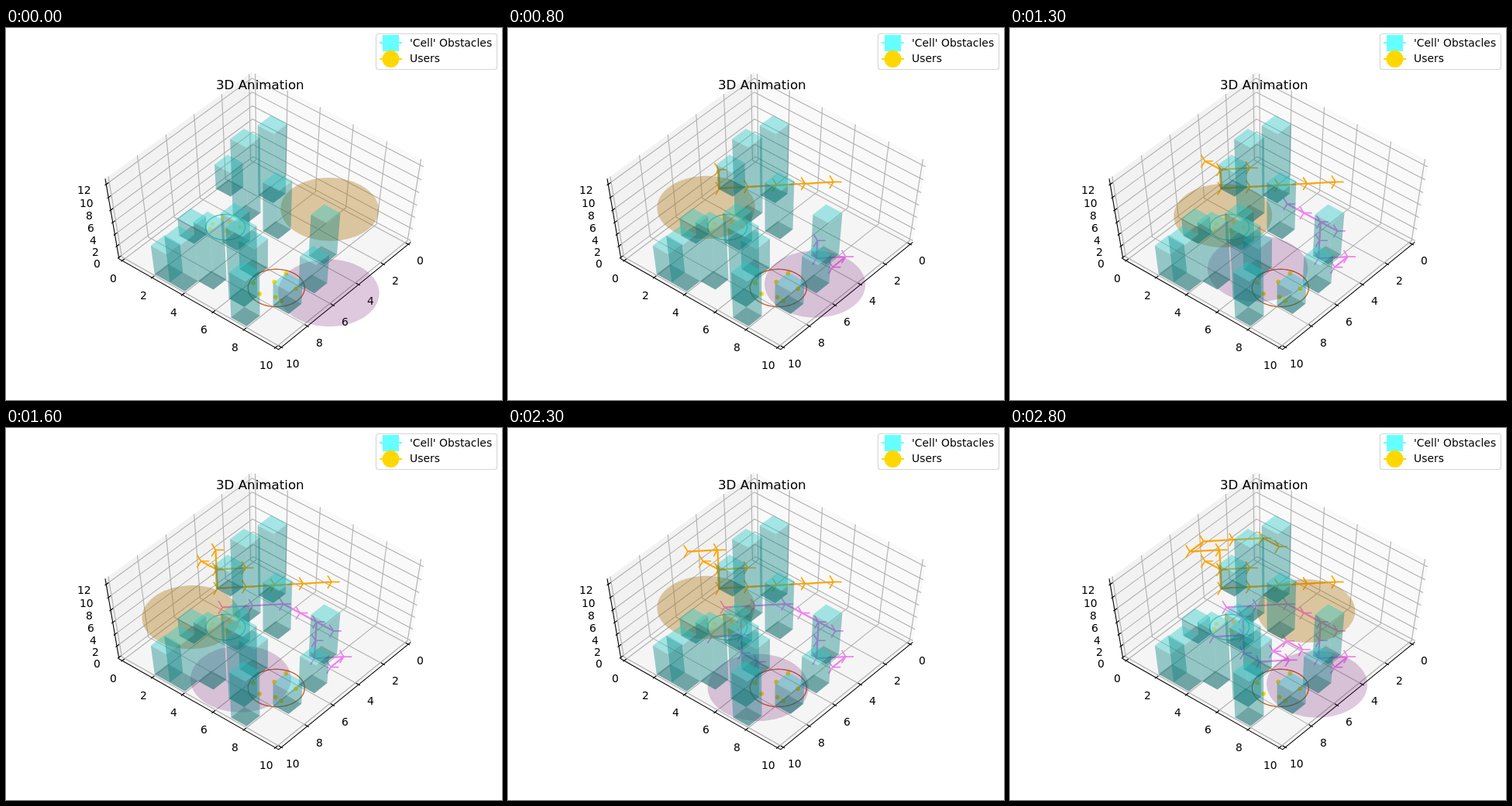
Animation of 640x480 px, one loop 2900 ms. Source, as an HTML page with a canvas:

```html
<!DOCTYPE html>
<html lang="en">
<head>
<meta charset="utf-8">
<title>3D Animation</title>
<style>
  html, body { margin: 0; width: 100%; height: 100%; overflow: hidden; background: #fff; }
  canvas { display: block; width: 640px; height: 480px; }
</style>
</head>
<body>
<canvas id="stage" width="640" height="480"></canvas>
<script>
const ctx = document.getElementById('stage').getContext('2d');
const STEP = 100, COUNT = 29, TOP = 12.6;
const LO = -1 / 4.8, HI = 10 + 1 / 4.8, ZLO = -TOP / 48, ZHI = TOP * 49 / 48;
const GRID = '#b0b0b0';

// Perspective camera: elevation 60, azimuth 40, distance 10.
const az = 40 * Math.PI / 180, el = 60 * Math.PI / 180;
const ca = Math.cos(az), sa = Math.sin(az), ce = Math.cos(el), se = Math.sin(el);
function project(x, y, z) {
  const a = x / 10 - .5, b = y / 10 - .5, c = z / TOP - .5;
  const depth = 10 - (a * ca * ce + b * sa * ce + c * se);
  const right = b * ca - a * sa;
  const up = c * ce - (a * ca + b * sa) * se;
  return [334.7 + 2681.1 * right / depth, 237.4 - 1997.8 * up / depth];
}

function trace(points) {
  ctx.beginPath();
  points.forEach(p => ctx.lineTo(...project(...p)));
}
function fill(points, color) {
  trace(points);
  ctx.fillStyle = color;
  ctx.fill();
}
function line(points, color, width = 1.1) {
  trace(points);
  ctx.strokeStyle = color;
  ctx.lineWidth = width;
  ctx.stroke();
}
function text(str, x, y, size = 13.89, centred = true) {
  ctx.font = size + 'px "DejaVu Sans", sans-serif';
  ctx.fillStyle = '#000';
  const left = centred ? x - ctx.measureText(str).width / 2 : x;
  ctx.fillText(str, Math.round(left), Math.round(y));
}
function disc(x, y, r, color) {
  ctx.beginPath();
  ctx.arc(x, y, r, 0, 2 * Math.PI);
  ctx.fillStyle = color;
  ctx.fill();
}
const polar = (x, y, r, t) => [x + r * Math.cos(t), y + r * Math.sin(t), 0];
const circle = (x, y, r) => Array.from({ length: 73 }, (_, i) => polar(x, y, r, i * Math.PI / 36));

// Towers: cell and height, painted back to front.
const towers = [
  [1, 2, 11], [3, 2, 12], [2, 0, 4], [3, 4, 8], [3, 7, 7],
  [5, 8, 5], [7, 8, 4], [9, 7, 8], [6, 5, 5], [6, 1, 3],
  [9, 2, 5], [9, 3, 8], [8, 4, 10], [5, 3, 5], [8, 6, 12]
].sort((p, q) => (p[0] - q[0]) * ca + (p[1] - q[1]) * sa);

// Users are scattered inside each group; distant ones fade.
const groups = [
  { x: 5, y: 2.36, r: 1, rim: '#40d0bc', alpha: .45 },
  { x: 6.9, y: 7.3, r: 1.4, rim: '#c8602c', alpha: 1 }
];
let seed = 7;
const random = () => (seed = seed * 16807 % 2147483647) / 2147483647;
for (const g of groups) {
  g.users = Array.from({ length: 7 }, (_, i) =>
    project(...polar(g.x, g.y, g.r * (.25 + .65 * random()), (i + random()) * Math.PI * 2 / 7)));
}

// Walks one cell per step from turn to turn [column, row, level, wait].
function walk(turns) {
  const path = [turns[0]];
  for (const [x, y, level, wait = 0] of turns.slice(1)) {
    const goal = [x, y, level];
    let at = path[path.length - 1];
    while (goal.some((v, i) => v !== at[i])) {
      at = goal.map((v, i) => at[i] + Math.sign(v - at[i]));
      path.push(at);
    }
    for (let i = 0; i < wait; i++) path.push(goal);
  }
  return path.map(([x, y, level]) => [x + .5, y + .5, 4.5 + 3 * level]);
}
const drones = [
  {
    color: '#ffa500', shade: 'rgba(170,115,12,.37)',
    path: walk([[0, 5, 0], [4, 1, 0], [4, 1, 1, 2], [4, 0, 1], [4, 1, 1, 1], [3, 2, 1], [4, 1, 1],
      [4, 1, 2, 2], [5, 0, 2, 6], [4, 0, 2], [2, 2, 2, 1], [2, 3, 2], [1, 4, 2]])
  },
  {
    color: '#ee82ee', shade: 'rgba(100,0,100,.21)',
    path: walk([[5, 9, 0], [4, 9, 0, 4], [5, 8, 0], [5, 8, 2], [5, 9, 2], [5, 6, 2], [7, 4, 2, 1],
      [7, 5, 2], [7, 5, 1], [8, 4, 1], [7, 5, 1], [7, 5, 0], [7, 6, 0, 2], [6, 7, 0], [6, 6, 0],
      [5, 6, 0], [5, 8, 0]])
  }
];

function drawAxes() {
  fill([[LO, LO, ZLO], [LO, HI, ZLO], [LO, HI, ZHI], [LO, LO, ZHI]], '#f9f9f9');
  fill([[LO, LO, ZLO], [HI, LO, ZLO], [HI, LO, ZHI], [LO, LO, ZHI]], '#f2f2f2');
  fill([[LO, LO, ZLO], [HI, LO, ZLO], [HI, HI, ZLO], [LO, HI, ZLO]], '#f5f5f5');

  for (let v = 0; v <= 10; v += 2) {
    line([[v, HI, ZLO], [v, LO, ZLO], [v, LO, ZHI]], GRID);
    line([[HI, v, ZLO], [LO, v, ZLO], [LO, v, ZHI]], GRID);
  }
  for (let z = 0; z <= 12; z += 2) line([[HI, LO, z], [LO, LO, z], [LO, HI, z]], GRID);

  line([[LO, HI, ZLO], [HI, HI, ZLO], [HI, LO, ZLO], [HI, LO, ZHI]], '#000');
  const near = HI - .17, far = HI + .09;
  const label = (v, p, dx, dy) => text(v, p[0] + dx, p[1] + dy + 5);
  for (let v = 0; v <= 10; v += 2) {
    line([[v, near, ZLO], [v, far, ZLO]], '#000');
    line([[near, v, ZLO], [far, v, ZLO]], '#000');
    label(v, project(v, HI, ZLO), 15, 21);
    label(v, project(HI, v, ZLO), -11.5, 22.5);
  }
  for (let z = 0; z <= 12; z += 2) {
    line([[near, LO, z], [far, LO, z]], '#000');
    label(z, project(HI, LO, z), -28, 7.5);
  }
}

function drawTrail(points, color) {
  if (!points.length) return;
  ctx.lineJoin = 'round';
  line(points, color, 2.2);
  ctx.lineWidth = 1.7;
  ctx.beginPath();
  for (const p of points) {
    const [x, y] = project(...p);
    for (const [dx, dy] of [[10.4, 0], [-5.2, -8.3], [-5.2, 8.3]]) {
      ctx.moveTo(x, y);
      ctx.lineTo(x + dx, y + dy);
    }
  }
  ctx.stroke();
}

function drawTower([u, v, h]) {
  const x = u + 1, y = v + 1, side = 'rgba(5,128,128,.4)';
  const slab = z => [[u, v, z], [x, v, z], [x, y, z], [u, y, z]];
  fill(slab(0), 'rgba(40,65,65,.3)');
  fill([[x, v, 0], [x, y, 0], [x, y, h], [x, v, h]], side);
  fill([[u, y, 0], [x, y, 0], [x, y, h], [u, y, h]], side);
  fill(slab(h), 'rgba(35,200,198,.4)');
}

function drawLegend() {
  ctx.beginPath();
  ctx.roundRect(477.5, 7.5, 156, 46, 3);
  ctx.fillStyle = 'rgba(255,255,255,.8)';
  ctx.fill();
  ctx.strokeStyle = '#d6d6d6';
  ctx.lineWidth = 1.2;
  ctx.stroke();
  ctx.fillStyle = '#66ffff';
  ctx.fillRect(482, 18, 29, 2);
  ctx.fillRect(486, 9, 21, 21);
  ctx.fillStyle = '#ffd700';
  ctx.fillRect(482, 39, 29, 2);
  disc(496.5, 40, 11, '#ffd700');
  text("'Cell' Obstacles", 521, 24, 13.89, false);
  text('Users', 521, 44, 13.89, false);
}

function draw(n) {
  ctx.fillStyle = '#fff';
  ctx.fillRect(0, 0, 640, 480);
  drawAxes();
  for (const g of groups) {
    ctx.globalAlpha = g.alpha;
    g.users.forEach(([x, y]) => disc(x, y, 2.8, '#ffd700'));
    ctx.globalAlpha = 1;
  }
  drones.forEach(d => drawTrail(d.path.slice(0, n), d.color));
  groups.forEach(g => line(circle(g.x, g.y, g.r), g.rim, 1.4));
  drones.forEach(d => fill(circle(d.path[n][0], d.path[n][1], 2.5), d.shade));
  towers.forEach(drawTower);
  text('3D Animation', 328, 79, 16.67);
  drawLegend();
}

let shown = -1;
const start = performance.now();
function tick() {
  const n = Math.floor((performance.now() - start) / STEP) % COUNT;
  if (n !== shown) draw(shown = n);
  requestAnimationFrame(tick);
}
tick();
</script>
</body>
</html>
```
